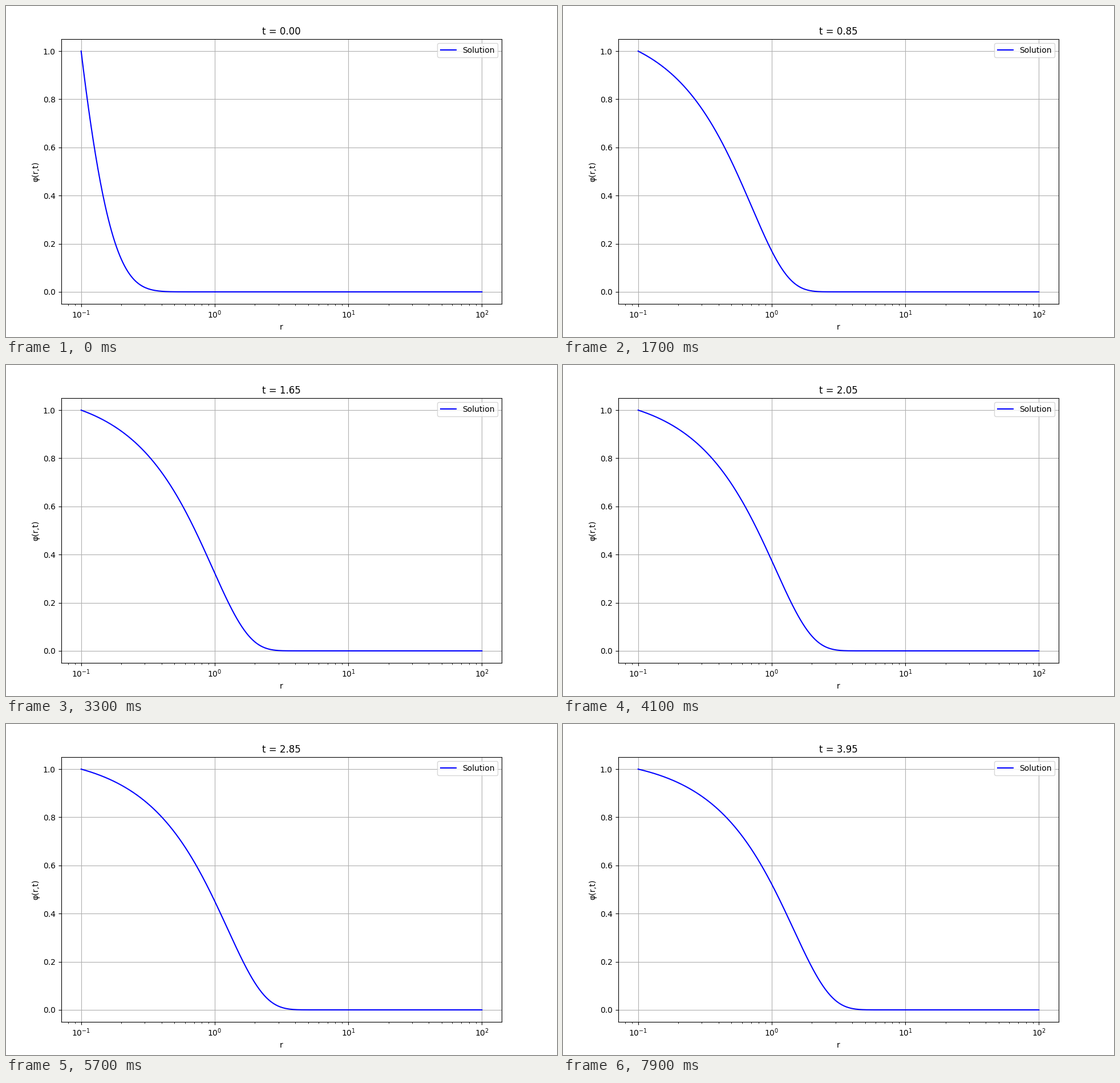
Recreate the animation shown at these times as a matplotlib script. Size 966 by 580 pixels, loop 8000 ms.

```python
import numpy as np
import matplotlib.pyplot as plt
from matplotlib.animation import FuncAnimation

FRAMES, INTERVAL = 80, 100
DT = 0.05            # model time per frame
DIFFUSIVITY = 0.25
R0, R1, N = 0.1, 100, 500
SUBSTEPS = 256


def second_derivative(r):
    """Second-derivative matrix on an uneven grid, both ends held fixed."""
    m = np.zeros((r.size, r.size))
    i = np.arange(1, r.size - 1)
    a, b = r[i] - r[i - 1], r[i + 1] - r[i]
    m[i, i - 1] = 2 / (a * (a + b))
    m[i, i] = -2 / (a * b)
    m[i, i + 1] = 2 / (b * (a + b))
    return m


def solve(r):
    """Diffusion profiles for every frame, starting from a steep exponential."""
    implicit = np.eye(r.size) - DT / SUBSTEPS * DIFFUSIVITY * second_derivative(r)
    step = np.linalg.matrix_power(np.linalg.inv(implicit), SUBSTEPS)
    phi = [np.exp(-(r - R0) / 0.05)]
    for _ in range(FRAMES - 1):
        phi.append(step @ phi[-1])
    return phi


r = np.logspace(np.log10(R0), np.log10(R1), N)
profiles = solve(r)

fig = plt.figure(figsize=(9.66, 5.8), dpi=100)
ax = fig.add_axes([0.1, 0.1, 0.8, 0.8])
line, = ax.plot(r, profiles[0], color="blue", label="Solution")
ax.set_xscale("log")
ax.set_xlabel("r")
ax.set_ylabel("φ(r,t)")
ax.grid(True)
ax.legend(loc="upper right")
title = ax.set_title("t = 0.00")


def update(k):
    line.set_ydata(profiles[k])
    title.set_text(f"t = {k * DT:.2f}")
    return line, title


anim = FuncAnimation(fig, update, frames=FRAMES, interval=INTERVAL,
                     repeat=True, repeat_delay=0)
plt.show()
```
